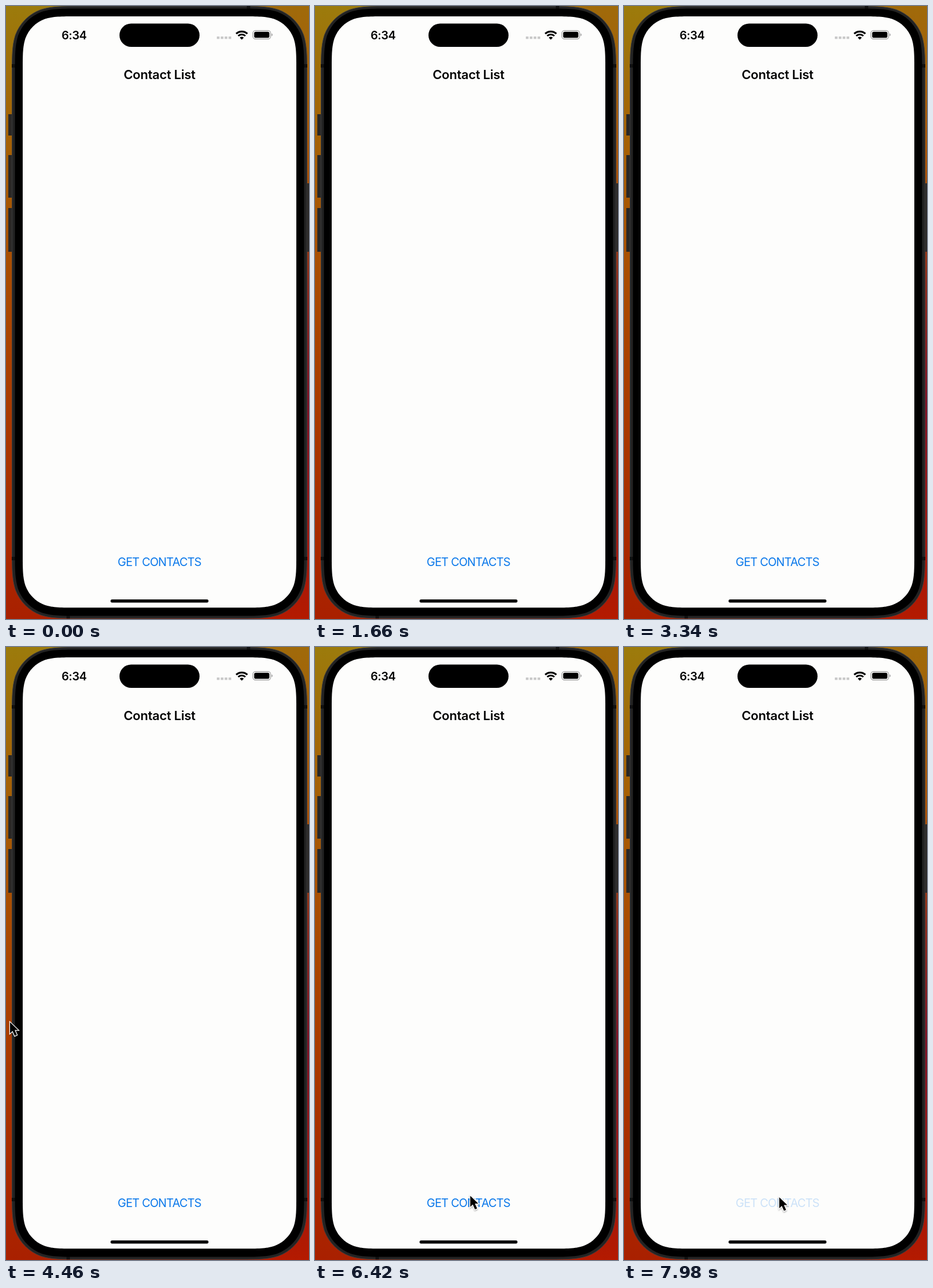
Animation of 526 by 1065 pixels, one loop 8 s. Source, as an HTML page:

```html
<!DOCTYPE html>
<html lang="en">
<head>
<meta charset="utf-8">
<title>Contact List</title>
<style>
  html, body { margin: 0; width: 100%; height: 100%; overflow: hidden; background: #000; }
  svg { display: block; width: 526px; height: 1065px; }
  text { font-family: Inter, "Liberation Sans", sans-serif; text-anchor: middle; }
</style>
</head>
<body>
<svg viewBox="0 0 526 1065">
  <defs>
    <linearGradient id="left" x2="0" y2="1">
      <stop offset="0" stop-color="#9c7b0c"/>
      <stop offset=".2" stop-color="#a56306"/>
      <stop offset=".5" stop-color="#ab4700"/>
      <stop offset="1" stop-color="#a92000"/>
    </linearGradient>
    <linearGradient id="right" x2="0" y2="1">
      <stop offset="0" stop-color="#a06a0a"/>
      <stop offset=".27" stop-color="#a85208"/>
      <stop offset=".45" stop-color="#8a2a1c"/>
      <stop offset=".65" stop-color="#7c1024"/>
      <stop offset="1" stop-color="#b41a00"/>
    </linearGradient>
    <filter id="shadow" x="-50%" y="-50%" width="200%" height="200%">
      <feDropShadow dx="0" dy="1.5" stdDeviation="1.3" flood-opacity=".35"/>
    </filter>
  </defs>

  <rect width="526" height="1065" fill="url(#left)"/>
  <rect x="263" width="263" height="1065" fill="url(#right)"/>

  <!-- side buttons -->
  <path d="M4 188h8v37h-8zM4 259h8v74h-8zM4 351h8v76h-8zM520 308h6v119h-6z" fill="#2a2827"/>

  <!-- body -->
  <path id="body" fill="#232323" stroke="#3c3c3c"/>
  <path d="M10 101h7v6h-7zM10 957h7v6h-7zM516 101h7v6h-7zM516 957h7v6h-7zM418 0h6v5h-6zM105 1059h6v5h-6z" fill="#111"/>
  <path id="bezel"/>
  <path id="screen" fill="#fdfdfc"/>

  <!-- status bar -->
  <rect x="197" y="30.5" width="139" height="40.5" rx="20.25"/>
  <text x="118.1" y="57.5" font-size="20" font-weight="600" letter-spacing="-.45">6:34</text>
  <path d="M366 55.2h25" stroke="#c9c9c9" stroke-width="4.2" stroke-dasharray="4.6 2.2"/>
  <g fill="none" stroke="#000" stroke-width="3.1">
    <path d="M399.6 48.2a14.1 14.1 0 0 1 19.4 0"/>
    <path d="M403.1 52a8.9 8.9 0 0 1 12.4 0"/>
  </g>
  <path d="M409.3 58.4l-3.5-3.5a5 5 0 0 1 7 0z"/>
  <rect x="428.6" y="42.6" width="30.8" height="14.8" rx="4.6" fill="none" stroke="#999" stroke-width="1.2"/>
  <rect x="430.8" y="44.8" width="26.4" height="10.4" rx="2.8"/>
  <path d="M461 47.5a2.7 2.7 0 0 1 0 5z" fill="#999"/>

  <text x="266.5" y="126.7" font-size="22" font-weight="600" letter-spacing="-.25">Contact List</text>
  <text id="button" x="266.3" y="972.8" font-size="20" letter-spacing="-.85" fill="#0a78ea">GET CONTACTS</text>
  <rect x="181.5" y="1031" width="170" height="5.4" rx="2.7"/>

  <path id="cursor" d="M0 0V19.2L4.4 15 8.2 23.6 11.9 21.9 8.1 13.5H14Z"
    stroke="#fff" stroke-width="2.4" paint-order="stroke" filter="url(#shadow)"/>
</svg>
<script>
  const LOOP = 8000;
  const byId = id => document.getElementById(id);
  const cursor = byId('cursor');
  const button = byId('button');

  // Half of a smooth corner, measured from the corner in radii; the rest is its mirror image.
  const corner = [[1.529, 0], [1.088, 0], [.868, 0], [.631, .075], [.373, .169]];

  function smoothRect(id, x, y, w, h, r) {
    const whole = [...corner, ...corner.map(([a, b]) => [b, a]).reverse()];
    const side = (flipX, flipY) => {
      const points = whole.map(([a, b]) =>
        [flipX ? x + w - a * r : x + a * r, flipY ? y + h - b * r : y + b * r]);
      if (flipX === flipY) points.reverse();
      return `${points[0]}C${points.slice(1).join(' ')}`;
    };
    byId(id).setAttribute('d',
      `M${side(false, false)}L${side(true, false)}L${side(true, true)}L${side(false, true)}Z`);
  }
  smoothRect('body', 10.5, .5, 512, 1063.5, 79);
  smoothRect('bezel', 15.5, 4.5, 502, 1055, 74);
  smoothRect('screen', 29, 18, 475, 1027.3, 61);

  const linear = p => p;
  const easeOut = p => 1 - (1 - p) ** 2;
  const easeInOut = p => p * p * (3 - 2 * p);
  const progress = (t, start, end) => Math.min(1, Math.max(0, (t - start) / (end - start)));

  // start, end, dx, dy, easing
  const moves = [
    [4400, 4460, 36, 18, linear],
    [4460, 5340, 218.5, 225, easeOut],
    [5440, 6040, 44.5, 77, easeInOut],
    [6420, 7540, 0, 2.5, easeInOut]
  ];

  const origin = performance.now();
  function draw() {
    const t = (performance.now() - origin) % LOOP;
    let x = -29.5, y = 633.5;
    for (const [start, end, dx, dy, ease] of moves) {
      const p = ease(progress(t, start, end));
      x += dx * p;
      y += dy * p;
    }
    cursor.setAttribute('transform', `translate(${x} ${y})`);
    button.setAttribute('opacity', 1 - 0.8 * easeInOut(progress(t, 7780, 7930)));
    requestAnimationFrame(draw);
  }
  draw();
</script>
</body>
</html>
```
